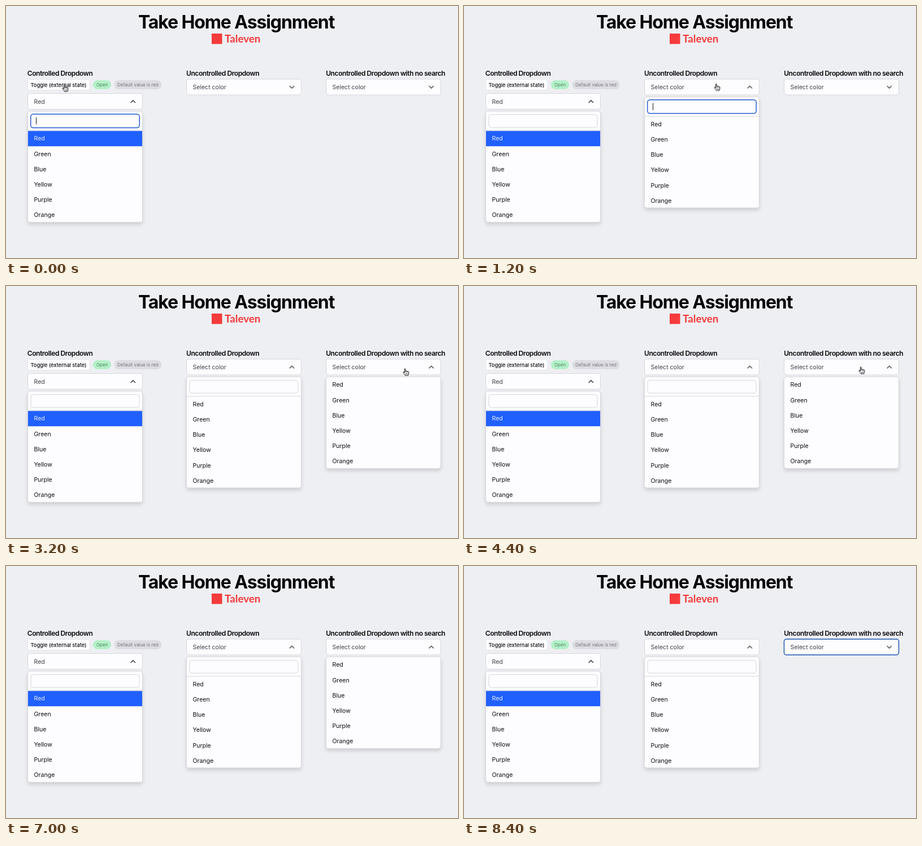
An HTML page that plays this animation: 800x448 px, repeating every 8.5 s.

```html
<!DOCTYPE html>
<html lang="en">
<head>
<meta charset="utf-8">
<title>Take Home Assignment</title>
<style>
  html, body { margin: 0; width: 100%; height: 100%; overflow: hidden; background: #eeeff3; }
  svg { display: block; width: 800px; height: 448px; }
  text { font: 400 10.56px Inter, sans-serif; fill: #0c0c0f; }
  .title { font-size: 32.1px; font-weight: 700; letter-spacing: -.036em; fill: #050507; text-anchor: middle; }
  .brand { font: 700 18.8px Lato, sans-serif; fill: #f63b3b; }
  .label { font-size: 12.06px; font-weight: 600; letter-spacing: -.036em; fill: #09090b; }
  .button { font-size: 9.2px; font-weight: 500; }
  .badge { font-size: 8px; }
  .value { fill: #3f3f46; }
  .box { fill: #fdfcfe; stroke: #d6d6dc; }
  .menu .panel { filter: drop-shadow(0 4px 3px rgb(0 0 0 / .13)); }
  .chevron { fill: none; stroke: #18181b; stroke-width: 1.25; stroke-linecap: round; stroke-linejoin: round; }
  .outline { fill: none; stroke: #2a63d9; stroke-width: 1.5; }
  .caret { stroke: #18181b; stroke-width: 1; }

  /* Hard state changes: 1% of the loop is 85 ms */
  .first .chevron { transform: scaleY(-1); }
  .second .menu, .second .focus, .third .menu, .third .trigger-focus, .ring { opacity: 0; }
  .first .focus { animation: first-focus 8.5s step-end infinite; }
  .first .caret { animation: first-caret 8.5s step-end infinite; }
  .second .menu { animation: second-open 8.5s step-end infinite; }
  .second .chevron { animation: second-flip 8.5s step-end infinite; }
  .second .focus { animation: second-focus 8.5s step-end infinite; }
  .second .caret { animation: second-caret 8.5s step-end infinite; }
  .third .menu { animation: third-open 8.5s step-end infinite; }
  .third .chevron { animation: third-flip 8.5s step-end infinite; }
  .third .trigger-focus { animation: third-focus 8.5s step-end infinite; }
  .ring { animation: click 8.5s step-end infinite; }
  .pointer { animation: travel 8.5s ease-in-out infinite, hide 8.5s step-end infinite; }

  @keyframes first-focus { 9.4%, 100% { opacity: 0; } }
  @keyframes first-caret { 5.8%, 100% { opacity: 0; } }
  @keyframes second-open { 9.4%, 100% { opacity: 1; } }
  @keyframes second-flip { 9.4%, 100% { transform: scaleY(-1); } }
  @keyframes second-focus { 9.4% { opacity: 1; } 22.3% { opacity: 0; } }
  @keyframes second-caret { 15.2% { opacity: 0; } 21.1% { opacity: 1; } }
  @keyframes third-open { 22.3% { opacity: 1; } 91.7% { opacity: 0; } }
  @keyframes third-flip { 22.3% { transform: scaleY(-1); } 91.7% { transform: none; } }
  @keyframes third-focus { 91.7%, 100% { opacity: 1; } }
  @keyframes click {
    9.4% { opacity: 1; } 11.7% { opacity: 0; }
    21.1% { opacity: 1; } 23.5% { opacity: 0; }
  }
  @keyframes hide { 77.6%, 100% { opacity: 0; } }
  @keyframes travel {
    0%, 1% { transform: translate(105px, 146px); }
    7.5%, 11.7% { transform: translate(396.5px, 143px); }
    20.5%, 30.5% { transform: translate(722.5px, 152px); }
    37%, 41% { transform: translate(708px, 153px); }
    50%, 52% { transform: translate(704px, 150px); }
    61%, 100% { transform: translate(703px, 149px); }
  }
</style>
</head>
<body>
<script>
  const COLORS = ['Red', 'Green', 'Blue', 'Yellow', 'Purple', 'Orange'];
  const WIDTH = 203, ROW = 27.15, SEARCH = 34.5;

  const text = (x, y, cls, content, style = '') =>
    `<text x="${x}" y="${y}" class="${cls}" style="${style}">${content}</text>`;
  const rect = (x, y, w, h, r, attrs) =>
    `<rect x="${x}" y="${y}" width="${w}" height="${h}" rx="${r}" ${attrs}/>`;

  const searchField = (x, y) => `
    ${rect(x + 5.5, y + 6, 192, 23, 4, 'class="box"')}
    <g class="focus">
      ${rect(x + 5.2, y + 5.2, 192.6, 24.3, 4.5, 'class="outline"')}
      <path class="caret" d="M${x + 15} ${y + 11}v12.5"/>
    </g>
    <path d="M${x} ${y + SEARCH}h${WIDTH}" stroke="#d6d6dc"/>`;

  function menu(x, y, search, selected) {
    const top = y + (search ? SEARCH : 0);
    const height = top - y + ROW * COLORS.length;
    const rows = COLORS.map((name, i) => {
      const rowY = top + i * ROW, on = name === selected;
      return (on ? rect(x + .5, rowY + .7, WIDTH - 1, ROW, 0, 'fill="#2060ff"') : '') +
        text(x + 11, rowY + 17.9, 'item', name, on ? 'fill:#e9eeff' : '');
    }).join('');
    return `<g class="menu">
      ${rect(x, y, WIDTH, height, 4, 'class="box panel"')}
      ${search ? searchField(x, y) : ''}${rows}</g>`;
  }

  const dropdown = (cls, x, y, { value = 'Select color', search = true, selected } = {}) => `
    <g class="${cls}">
      ${rect(x, y, WIDTH, 28, 4, 'class="box"')}
      ${rect(x, y, WIDTH, 28, 4, 'class="outline trigger-focus" style="stroke:#1f5bb5"' +
        (search ? ' visibility="hidden"' : ''))}
      ${text(x + 11, y + 18, 'value', value)}
      <g transform="translate(${x + 186.3} ${y + 14.2})"><path class="chevron" d="M-3.8-1.9L0 1.9L3.8-1.9"/></g>
      ${menu(x, y + 31.5, search, selected)}
    </g>`;

  document.body.innerHTML = `<svg viewBox="0 0 800 448">
    ${text(407.6, 39.5, 'title', 'Take Home Assignment')}
    ${rect(364, 49, 18.5, 18.5, 0, 'fill="#f63b3b"')}
    ${text(387, 65, 'brand', 'Taleven')}

    ${text(37.7, 124.2, 'label', 'Controlled Dropdown')}
    ${text(319, 124.2, 'label', 'Uncontrolled Dropdown')}
    ${text(566.2, 124.2, 'label', 'Uncontrolled Dropdown with no search')}

    ${rect(38.5, 130.5, 109.5, 19, 3, 'class="box" style="stroke:#e6e6eb"')}
    ${text(43.6, 143.5, 'button', 'Toggle (external state)')}
    ${rect(154, 132, 32, 16, 8, 'fill="#b3f0c7"')}
    ${text(159.9, 142.9, 'badge', 'Open', 'fill:#4f8763')}
    ${rect(191.5, 132, 84, 16, 8, 'fill="#dcdce2"')}
    ${text(197, 142.9, 'badge', 'Default value is red', 'fill:#74747d')}

    ${dropdown('first', 38.5, 155.5, { value: 'Red', selected: 'Red' })}
    ${dropdown('second', 319.5, 130)}
    ${dropdown('third', 566.5, 130, { search: false })}

    <g class="pointer">
      <circle class="ring" cx="-1.5" cy="-5" r="19.3" fill="none" stroke="#0a0a0a" stroke-width="2"/>
      <path fill="#fff" stroke="#111" stroke-width="1" stroke-linejoin="round" d="M-2.6 1.5V-5C-2.6-6.4-.8-6.4-.8-5V-1.6
        C-.4-2.5 1-2.4 1.1-1.3C1.6-2.1 2.9-1.9 3-.8C3.6-1.4 4.8-1.1 4.8 0V2.4C4.8 4 3.8 4.6 3.8 6H-1.6
        C-1.8 4.6-3.6 3.2-4.8 1.2C-5.6 0-4.2-.9-3.4.1Z"/>
      <path fill="none" stroke="#111" stroke-width=".8" d="M-.8-1.6V.6M1.1-1.3V.8M3-.8V.9M-.4 2.4V4.4M1.2 2.4V4.4M2.8 2.4V4.4"/>
    </g>
  </svg>`;
</script>
</body>
</html>
```
